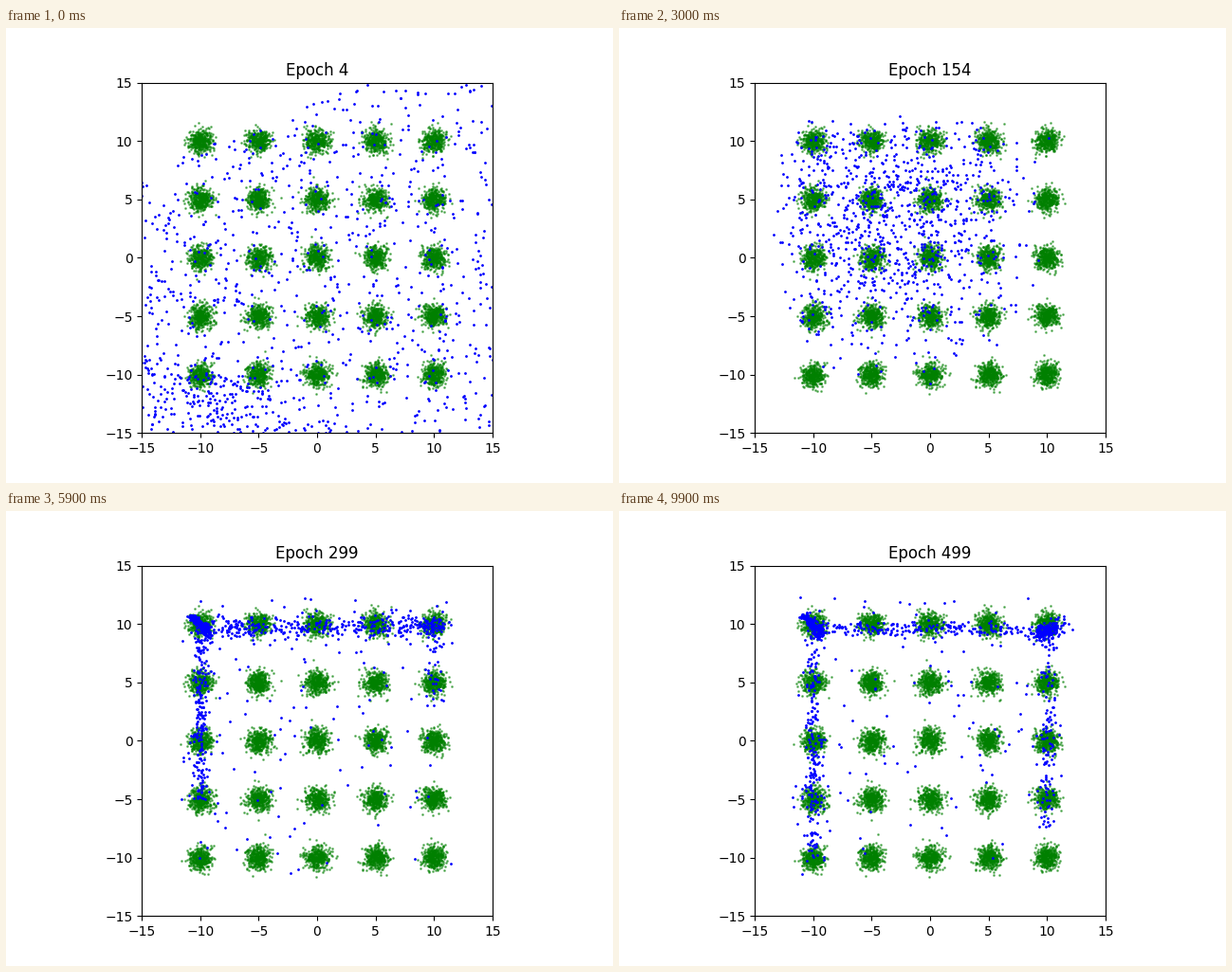
A matplotlib script for the animation above (10000 ms loop, 640 px wide and 480 px high).

```python
import numpy as np
import matplotlib.pyplot as plt
from matplotlib.animation import FuncAnimation

FRAMES = 100
N = 1000


def ramp(i, start, end):
    """Linear progress from 0 to 1 between two frames."""
    return np.clip((i - start) / (end - start), 0, 1)


def cloud(rng, i):
    """Scattered points that contract, drift to the upper left and thin out."""
    pull = ramp(i, 0, 13)
    drift = ramp(i, 13, 30)
    settle = ramp(i, 25, 56)
    free = pull * (1 - settle)
    a = 1 + 1.2 * free
    half = 15 - 3 * pull
    x = -1.8 * free + half * (2 * rng.beta(a, a * (1 + 0.3 * drift), N) - 1)
    y = 0.3 * pull + half * (2 * rng.beta(a * (1 + 0.5 * drift), a, N) - 1)

    # At first the upper left is empty and the lower left crowded
    y = np.where(y > 13.4 + 0.4 * x + 20 * pull, -y, y)
    blob = rng.random(N) < 0.12 * (1 - pull)
    x = np.where(blob, rng.normal(-9, 3, N), x)
    y = np.where(blob, rng.uniform(-14.5, -10, N), y)
    return x, y


def generate(i):
    rng = np.random.default_rng(1000 + i)
    edge = ramp(i, 42, 57)
    gain = ramp(i, 59, 73)
    fall = ramp(i, 73, 99)
    right_x = 10 - gain + fall
    right_y = 9.9 + 0.6 * gain - 1.1 * fall

    t = rng.random(N)
    z, w = rng.normal(size=(2, N))
    parts = [
        (1 - 0.86 * edge, cloud(rng, i)),
        # left corner, left side, top, right corner, right side
        (0.20 * edge, (-10.8 + 1.6 * t + 0.15 * z,
                       10.7 - 1.6 * t + (0.1 + 0.25 * t) * w)),
        (0.22 * edge, (-10 + 0.35 * z, 9.5 - (14.5 + 5 * fall) * t)),
        ((0.33 - 0.1 * gain) * edge,
         (-9.5 + 20.3 * t, 9.65 + (right_y - 9.65) * t ** 2
          + (0.5 - 0.2 * gain) * w)),
        ((0.04 + 0.13 * gain) * edge,
         (right_x + 0.65 * z, right_y + 0.15 * z + 0.35 * w)),
        ((0.03 + 0.14 * fall) * edge,
         (right_x + 0.4 * z, 9.5 - (6.5 + 10.5 * fall) * t)),
    ]
    shares, points = zip(*parts)
    kind = rng.choice(len(parts), N, p=np.array(shares) / sum(shares))
    return np.column_stack([np.choose(kind, axis) for axis in zip(*points)])


fig, ax = plt.subplots(figsize=(6.4, 4.8), dpi=100)
ax.set_aspect("equal")
ticks = np.arange(-15, 16, 5)
ax.set(xlim=(-15, 15), ylim=(-15, 15), xticks=ticks, yticks=ticks)

grid = np.arange(-10, 11, 5)
centers = np.array([(cx, cy) for cx in grid for cy in grid])
real = np.repeat(centers, 400, axis=0)
real = real + np.random.default_rng(7).normal(0, 0.5, real.shape)
ax.scatter(*real.T, s=1, c="green", alpha=0.5)
fake = ax.scatter([], [], s=1, c="blue")
title = ax.set_title("", pad=5.4)


def update(i):
    fake.set_offsets(generate(i))
    title.set_text(f"Epoch {4 + 5 * i}")
    return fake, title


anim = FuncAnimation(fig, update, frames=FRAMES, interval=100,
                     repeat=True, repeat_delay=0)
plt.show()
```
